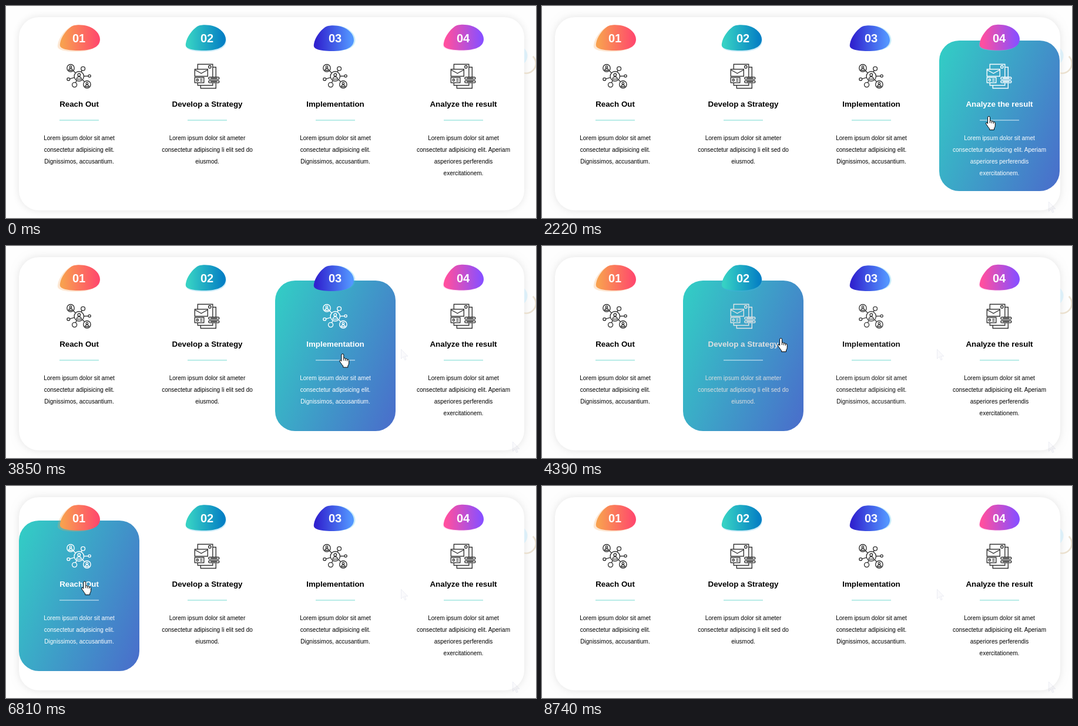
Recreate the animation shown at these times as an HTML page with a canvas. Size 902x362 px, loop 9.2 s.

```html
<!DOCTYPE html>
<html lang="en">
<head>
<meta charset="utf-8">
<title>Process steps</title>
<style>
  html, body { margin: 0; width: 100%; height: 100%; overflow: hidden; background: #fefefe; }
  canvas, svg { position: absolute; left: 0; top: 0; width: 902px; height: 362px; }
  text { font-family: "Liberation Sans", Arial, sans-serif; text-anchor: middle; }
  .num { font-size: 20px; font-weight: bold; fill: #fff; }
  .title { font-size: 13.33px; font-weight: bold; }
  .body { font-size: 10px; }
</style>
</head>
<body>
<canvas width="902" height="362"></canvas>
<svg viewBox="0 0 902 362">
  <g id="labels"></g>
  <g id="cursor" fill="#fff" stroke="#000" stroke-linejoin="round">
    <path id="arrow"/>
    <path id="hand"/>
  </g>
</svg>
<script>
const LOOP = 9200, FADE = 500;
const CARD = { x: 22, y: 59, w: 205, h: 257, r: 34, step: 218 };
const ARROW = 'M.5 .5V16.5L4.2 13L6.8 18.8L9.2 17.8L6.7 12.2H11.8Z';
const HAND = 'M.7 .6Q2.6 .6 2.6 2.6V8Q5 6.9 5.6 9Q8 8 8.5 10Q11.4 9.4 11.4 12.2V16.2' +
  'Q11.4 19 9.6 21V23.6H1.6V21.4Q-.8 19 -2 16.6L-4.2 13.6Q-4.9 11 -2.8 11.2L-1.3 13V2.6Q-1.3 .6 .7 .6Z' +
  'M2.6 8V12M5.6 9V12.4M8.5 10V13';
const BLOB = new Path2D('M0 32C2 20 11 9 18 4C24 -1 38 0 46 2C60 6 68 16 68 25' +
  'C68 36 58 41 46 43C32 45 14 44 6 41C1 39 -1 37 0 32Z');

const cards = [
  { title: 'Reach Out', icon: drawNetwork,
    lines: ['Lorem ipsum dolor sit amet', 'consectetur adipisicing elit.', 'Dignissimos, accusantium.'],
    badge: { x: 92, y: 32, from: '#f8a04f', to: '#ff4a6c', halo: 'rgba(248,160,80,.25)', dx: -4, dy: 2 } },
  { title: 'Develop a Strategy', icon: drawPapers,
    lines: ['Lorem ipsum dolor sit ameter', 'consectetur adipiscing li elit sed do', 'eiusmod.'],
    badge: { x: 306, y: 32, from: '#36d1c4', to: '#0580c4', halo: 'rgba(60,180,230,.25)', dx: 1, dy: 2 } },
  { title: 'Implementation', icon: drawNetwork,
    lines: ['Lorem ipsum dolor sit amet', 'consectetur adipisicing elit.', 'Dignissimos, accusantium.'],
    badge: { x: 524, y: 33, from: '#3023cf', to: '#5396ff', halo: 'rgba(70,190,235,.3)', dx: 2.5, dy: 0 } },
  { title: 'Analyze the result', icon: drawPapers,
    lines: ['Lorem ipsum dolor sit amet', 'consectetur adipisicing elit. Aperiam', 'asperiores perferendis', 'exercitationem.'],
    badge: { x: 745, y: 31.5, from: '#ff4f9f', to: '#8a4fff', halo: 'rgba(255,150,220,.3)', dx: -1, dy: 1 } }
];

// card, pointer enters, pointer leaves
const visits = [[3, 885, 2370], [2, 2420, 4045], [1, 4100, 5480], [0, 5525, 7705], [1, 7745, 8240]];

// time, x, y of the pointer tip
const route = [
  [840, 862, 334], [1070, 820, 236], [1400, 784, 192], [2130, 784, 192],
  [2390, 672, 176], [2610, 611, 183], [2800, 592, 186], [3770, 592, 186],
  [4075, 451, 168], [4390, 406, 157], [4520, 400, 156], [5330, 400, 156],
  [5500, 233, 160], [5850, 130, 160], [6770, 130, 160], [6810, 133, 162],
  [7200, 185, 267], [7590, 185, 267], [7725, 233, 287], [8120, 343, 270],
  [8240, 352, 316], [8330, 356, 331]
];

const ctx = document.querySelector('canvas').getContext('2d');
const byId = id => document.getElementById(id);
const cursor = byId('cursor'), arrow = byId('arrow'), hand = byId('hand');
arrow.setAttribute('d', ARROW);
hand.setAttribute('d', HAND);
const arrowPath = new Path2D(ARROW);

function addText(cls, x, y, str) {
  const el = document.createElementNS('http://www.w3.org/2000/svg', 'text');
  el.setAttribute('class', cls);
  el.setAttribute('x', x);
  el.setAttribute('y', y);
  el.textContent = str;
  byId('labels').append(el);
  return el;
}

cards.forEach((c, i) => {
  c.x = CARD.x + i * CARD.step;
  c.mid = c.x + CARD.w / 2;
  addText('num', c.mid - .5, 62, '0' + (i + 1));
  c.texts = [addText('title', c.mid, 172, c.title),
    ...c.lines.map((s, n) => addText('body', c.mid, 229 + n * 20, s))];
});

// CSS "ease": cubic-bezier(.25, .1, .25, 1)
function ease(p) {
  if (p <= 0) return 0;
  if (p >= 1) return 1;
  const curve = (a, b, s) => 3 * a * s * (1 - s) ** 2 + 3 * b * s * s * (1 - s) + s ** 3;
  let lo = 0, hi = 1;
  for (let k = 0; k < 20; k++) {
    const s = (lo + hi) / 2;
    if (curve(.25, .25, s) < p) lo = s; else hi = s;
  }
  return curve(.1, 1, lo);
}

function hoverState(card, t) {
  let fade = 0, on = false;
  for (const [c, enter, leave] of visits) {
    if (c !== card || t < enter) continue;
    on = t < leave;
    fade = on ? ease((t - enter) / FADE) : 1 - ease((t - leave) / FADE);
  }
  return { fade, on };
}

// Smooth path through the route that comes to rest at each pause
function pointer(t) {
  const n = route.findIndex(k => k[0] > t);
  if (n < 1) return null;
  const a = route[n - 1], b = route[n], span = b[0] - a[0], u = (t - a[0]) / span;
  const slope = (k, d) => {
    const p = route[k - 1], c = route[k], q = route[k + 1];
    if (!p || !q || p[1] === c[1] || q[1] === c[1]) return 0;
    return (q[d] - p[d]) / (q[0] - p[0]);
  };
  return [1, 2].map(d => {
    const h = u * u * (3 - 2 * u);
    return a[d] + (b[d] - a[d]) * h +
      span * (slope(n - 1, d) * u * (1 - u) ** 2 - slope(n, d) * u * u * (1 - u));
  });
}

function roundBox(x, y, w, h, r) {
  ctx.beginPath();
  ctx.roundRect(x, y, w, h, r);
}

function ring(x, y, r) {
  ctx.beginPath();
  ctx.arc(x, y, r, 0, Math.PI * 2);
  ctx.stroke();
}

function line(...p) {
  ctx.beginPath();
  for (let i = 0; i < p.length; i += 2) ctx.lineTo(p[i], p[i + 1]);
  ctx.stroke();
}

function person(x, y, r) {
  ring(x, y, r);
  ring(x, y - r * .3, r * .28);
  ctx.beginPath();
  ctx.arc(x, y + r * .6, r * .5, Math.PI, 0);
  ctx.closePath();
  ctx.stroke();
}

function drawNetwork() {
  person(0, 0, 8.2);
  person(-14.3, -14, 6.2);
  person(13.6, 14, 6.2);
  ring(6.8, -13, 3.4);
  ring(17.8, -.5, 2.1);
  ring(-18, 5, 2.4);
  ring(-7.7, 14.6, 4);
  line(-9.8, -9.6, -6, -5.8);
  line(5.9, 5.8, 9.2, 9.4);
  line(3.6, -7.5, 5.2, -10);
  line(8.2, -.2, 15.6, -.4);
  line(-15.7, 4.4, -7.9, 2.2);
  line(-5.9, 11, -4, 7.2);
}

function drawPapers() {
  line(-16, -12, -16, -20.5, 9.5, -20.5, 9.5, 1);
  line(9.5, -15.5, 15, -15.5, 15, 1);
  ring(4.5, -16, 2.2);
  ctx.strokeRect(-21, -12, 22, 12);
  line(-21, -11, -10, -5, 1, -11);
  ctx.strokeRect(-21, 2, 15.5, 9);
  ring(-16.5, 6.5, 1.7);
  line(-12, 5, -8, 5);
  line(-12, 8, -8, 8);
  line(-16, 11, -16, 15.5, 9.5, 15.5, 9.5, 12);
  line(-11, 15.5, -11, 20.5, 15, 20.5, 15, 12);
  for (const y of [1.5, 7.5]) {
    roundBox(2.5, y, 18, 3.6, 1.8);
    ctx.stroke();
    line(6, y + 1.8, 17, y + 1.8);
  }
}

function drawStage() {
  ctx.fillStyle = '#fefefe';
  ctx.fillRect(0, 0, 902, 362);
  ctx.save();
  ctx.shadowColor = 'rgba(0,0,0,.1)';
  ctx.shadowBlur = 13;
  ctx.fillStyle = '#fff';
  roundBox(22, 19, 860, 330, 34);
  ctx.fill();
  ctx.restore();

  ctx.save();
  ctx.beginPath();
  ctx.rect(882, 60, 20, 70);
  ctx.clip();
  ctx.fillStyle = '#dceff8';
  ctx.beginPath();
  ctx.arc(870, 85, 17.5, 0, Math.PI * 2);
  ctx.fill();
  ctx.strokeStyle = '#ebe1d0';
  ctx.lineWidth = 2.6;
  ctx.beginPath();
  ctx.arc(885, 98, 16.8, -.8, 1.8);
  ctx.stroke();
  ctx.restore();
}

function drawCardFill(c) {
  const a = 112 * Math.PI / 180, sx = Math.sin(a), sy = -Math.cos(a);
  const half = (CARD.w * sx + CARD.h * sy) / 2, cy = CARD.y + CARD.h / 2;
  const g = ctx.createLinearGradient(c.mid - sx * half, cy - sy * half, c.mid + sx * half, cy + sy * half);
  g.addColorStop(0, '#32cfc5');
  g.addColorStop(1, '#4a6ccb');
  ctx.fillStyle = g;
  roundBox(c.x, CARD.y, CARD.w, CARD.h, CARD.r);
  ctx.fill();
}

function drawBadge(b) {
  ctx.save();
  ctx.translate(b.x + b.dx, b.y + b.dy);
  ctx.fillStyle = b.halo;
  ctx.fill(BLOB);
  ctx.translate(-b.dx, -b.dy);
  const g = ctx.createLinearGradient(4, 0, 64, 0);
  g.addColorStop(0, b.from);
  g.addColorStop(1, b.to);
  ctx.fillStyle = g;
  ctx.fill(BLOB);
  ctx.restore();
}

function drawCard(c, i, t) {
  const { fade, on } = hoverState(i, t);
  const grey = base => {
    const v = Math.round(base + (255 - base) * fade);
    return `rgb(${v},${v},${v})`;
  };
  if (on) drawCardFill(c);
  drawBadge(c.badge);
  ctx.save();
  ctx.translate(c.mid - .2, 120);
  ctx.strokeStyle = grey(50);
  ctx.lineWidth = 1.4;
  c.icon();
  ctx.restore();
  ctx.fillStyle = on ? 'rgba(255,255,255,.42)' : '#b8ece7';
  ctx.fillRect(c.mid - 33.5, 194, 67, 2);
  c.texts.forEach(el => el.setAttribute('fill', grey(0)));
}

function drawTrace(x, y) {
  ctx.save();
  ctx.translate(x, y);
  ctx.fillStyle = 'rgba(120,130,190,.04)';
  ctx.strokeStyle = 'rgba(100,110,170,.1)';
  ctx.fill(arrowPath);
  ctx.stroke(arrowPath);
  ctx.restore();
}

function drawCursor(t) {
  const p = pointer(t);
  cursor.style.display = p ? '' : 'none';
  if (!p) return;
  const over = visits.some(v => t >= v[1] && t < v[2]);
  cursor.setAttribute('transform', `translate(${p[0].toFixed(2)} ${p[1].toFixed(2)})`);
  hand.style.display = over ? '' : 'none';
  arrow.style.display = over ? 'none' : '';
}

function render(t) {
  drawStage();
  cards.forEach((c, i) => drawCard(c, i, t));
  if (t > 885) drawTrace(862, 334);
  if (t > 2420 && t < LOOP) drawTrace(672, 176);
  drawCursor(t);
}

const start = performance.now();
function tick() {
  render((performance.now() - start) % LOOP);
  requestAnimationFrame(tick);
}
tick();
</script>
</body>
</html>
```
